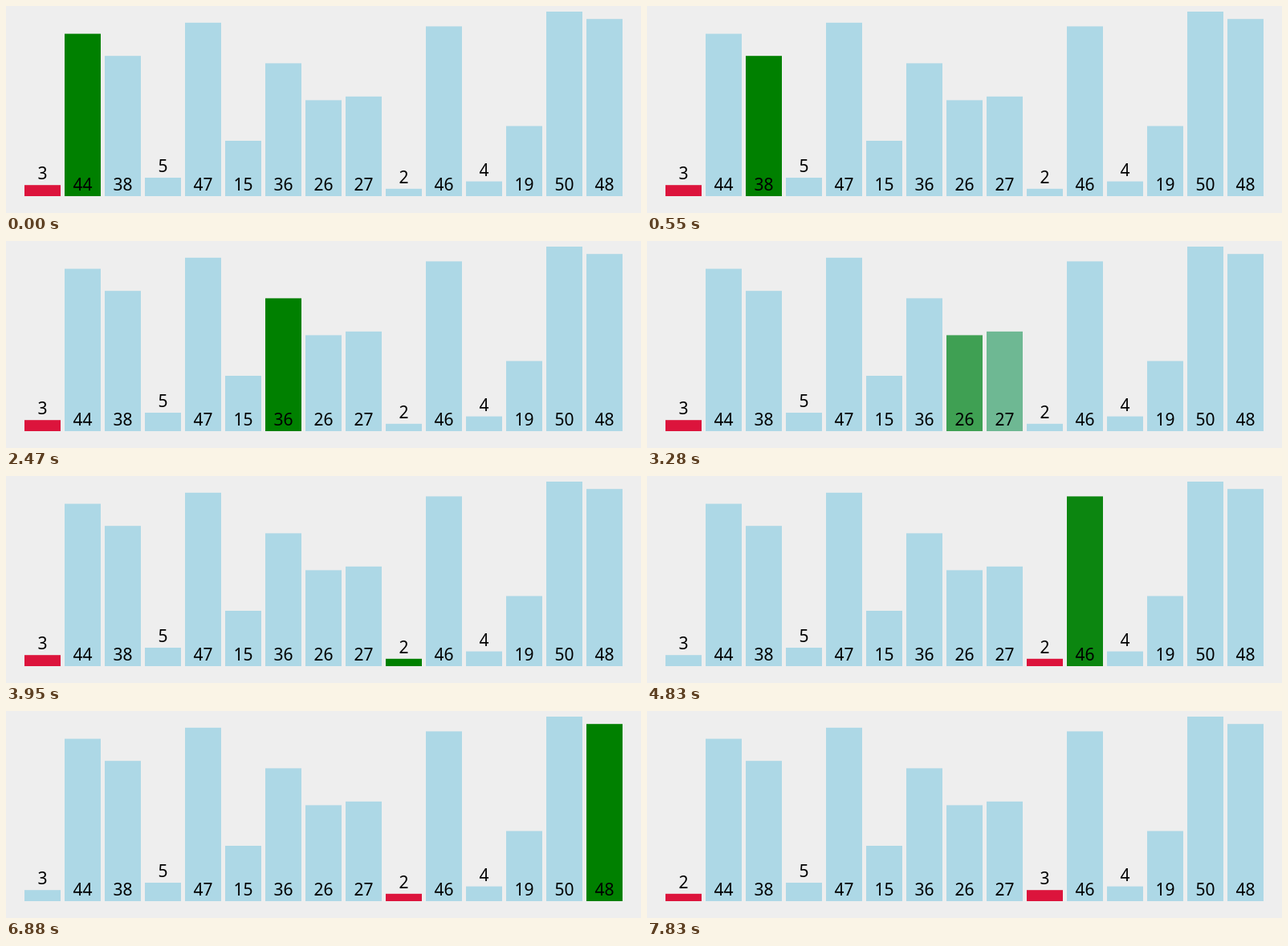
Animation, 791 px wide and 258 px high, one loop 8 s. Source, as an HTML page with a canvas:

```html
<!DOCTYPE html>
<html lang="en">
<head>
<meta charset="utf-8">
<title>Selection sort</title>
<style>
  html, body { margin: 0; height: 100%; overflow: hidden; background: #eee; }
  canvas { display: block; }
</style>
</head>
<body>
<canvas id="stage" width="791" height="258"></canvas>
<script>
const ctx = document.getElementById('stage').getContext('2d');
const values = [3, 44, 38, 5, 47, 15, 36, 26, 27, 2, 46, 4, 19, 50, 48];
const BASE = 237, UNIT = 4.6, WIDTH = 45, PITCH = 50, LEFT = 23;
const LOOP = 8000, FIRST = 225, PERIOD = 485, FADE = 325;
const BLUE = [173, 216, 230], GREEN = [0, 128, 0], RED = [220, 20, 60];

// One pass of the sort: each step lists the bars that take a new colour.
const steps = [];
let min = 0;
for (let i = 1; i < values.length; i++) {
  const step = { [i]: GREEN };
  if (i - 1 !== min) step[i - 1] = BLUE;
  steps.push(step);
  if (values[i] < values[min]) {
    steps.push({ [min]: BLUE, [i]: RED });
    min = i;
  }
}
steps.push({ [values.length - 1]: BLUE, 0: RED });

const initial = values.map(() => BLUE);
initial[0] = RED;
Object.assign(initial, steps.shift());

const mix = (a, b, p) => a + (b - a) * p;
const easeInOut = t => t < 0.5 ? 4 * t ** 3 : 1 - 4 * (1 - t) ** 3;

function progress(step, now) {
  const t = (now - FIRST - PERIOD * step) / FADE;
  return easeInOut(Math.min(1, Math.max(0, t)));
}

function drawBar(value, position, colour) {
  const x = LEFT + position * PITCH;
  const top = BASE - value * UNIT;
  ctx.fillStyle = `rgb(${colour.map(Math.round)})`;
  ctx.fillRect(x, top, WIDTH, BASE - top);
  ctx.fillStyle = '#000';
  ctx.fillText(value, x + WIDTH / 2, (value < 10 ? top : BASE) - 7);
}

function draw(now) {
  const colours = [...initial];
  steps.forEach((step, n) => {
    const p = progress(n, now);
    for (const [i, goal] of Object.entries(step))
      colours[i] = colours[i].map((c, k) => mix(c, goal[k], p));
  });

  const positions = values.map((_, i) => i);
  const swapped = progress(steps.length, now);
  positions[0] = mix(0, min, swapped);
  positions[min] = mix(min, 0, swapped);

  ctx.fillStyle = '#eee';
  ctx.fillRect(0, 0, 791, 258);
  ctx.font = '21px "Noto Sans", "Open Sans", sans-serif';
  ctx.textAlign = 'center';
  values.forEach((value, i) => drawBar(value, positions[i], colours[i]));
}

const start = performance.now();
function tick() {
  draw((performance.now() - start) % LOOP);
  requestAnimationFrame(tick);
}
tick();
</script>
</body>
</html>
```
